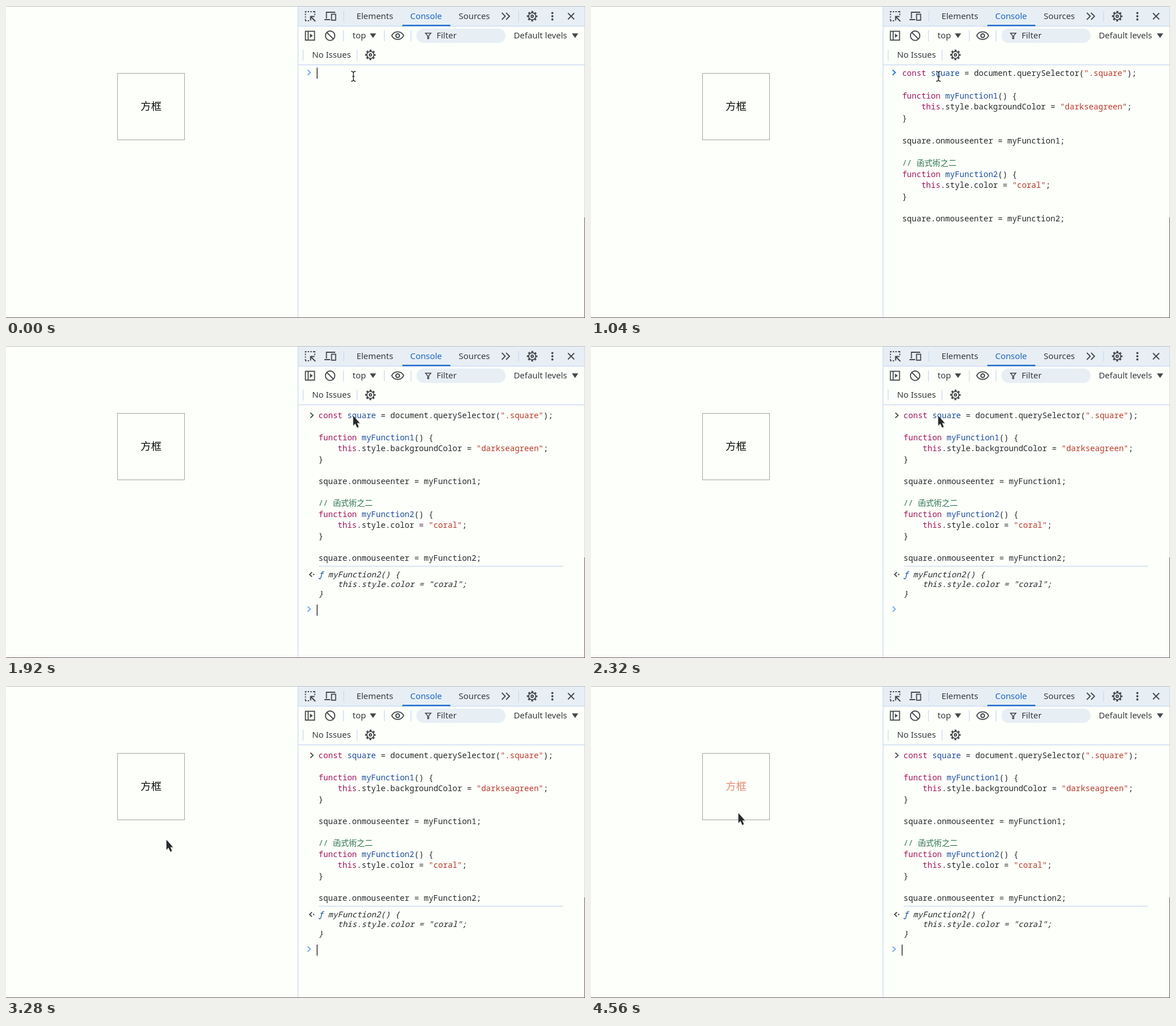
Animation, 1020 px wide and 549 px high, one loop 4640 ms. Source, as an HTML page:

```html
<!DOCTYPE html>
<html lang="zh-Hant">
<head>
<meta charset="utf-8">
<title>Console demo</title>
<style>
html, body { margin: 0; width: 100%; height: 100%; overflow: hidden; background: #fdfffa; }
svg { display: block; width: 1020px; height: 549px; }
text { white-space: pre; fill: #26292b; }
.ui text { font: 14.9px "Noto Sans", sans-serif; fill: #36393c; }
.ui .active { fill: #1c66c4; }
.code text { font: 14.05px "Noto Sans Mono", "Noto Sans CJK TC", "Noto Sans CJK", monospace; }
.code .result { font-style: italic; }
.label { font: 18.5px "Noto Sans CJK TC", "Noto Sans CJK", sans-serif; }
.kw { fill: #a3175e; }
.def { fill: #1c4d9f; }
.str { fill: #b93a2c; }
.com { fill: #2b7250; }
.icon { fill: none; stroke: #43474a; stroke-width: 1.8; }
.solid { fill: #43474a; stroke: none; }
.sep { stroke: #cddcf2; stroke-width: 1.4; fill: none; }
.chev { fill: none; stroke-width: 1.8; }
</style>
</head>
<body>
<svg viewBox="0 0 1020 549">
  <defs>
    <g id="gear" class="icon">
      <circle r="8" stroke-width="2.6" stroke-dasharray="3.3 2.983" stroke-dashoffset="1.65"/>
      <circle r="6.2"/>
      <circle r="2" stroke-width="2"/>
    </g>
  </defs>

  <rect width="1020" height="549" fill="#fdfffa"/>
  <rect x="515" y="1" width="505" height="34" fill="#e7eff5"/>
  <path d="M0 .5H1020" stroke="#bcbfbd"/>
  <path d="M1019.5 1V372" stroke="#d2d6da"/>
  <path d="M1019.5 372V549M0 548.5H1020" stroke="#70585f"/>
  <path class="sep" d="M514.5 1V548M515 35.5H1019M515 103.5H1019"/>
  <path class="sep" d="M595 9V27M903 9V27M594.5 43V62M666.5 43V62M713.5 43V62M523.5 77V96M618.5 77V96"/>
  <rect x="698" y="33" width="85" height="2.6" rx="1" fill="#1f6fd0"/>
  <rect x="723" y="39.5" width="157" height="25.5" rx="12.7" fill="#e7eff5"/>

  <g class="ui">
    <text x="617.5" y="23.3">Elements</text>
    <text x="712" y="23.3" class="active">Console</text>
    <text x="797.5" y="23.3">Sources</text>
    <text x="610.5" y="57.3">top</text>
    <text x="758.5" y="57.3">Filter</text>
    <text x="894.5" y="57.3">Default levels</text>
    <text x="539.3" y="91.3">No Issues</text>
  </g>

  <g class="icon">
    <path d="M527 10H545M527.5 9V27M544 9V17M527 26H535" stroke-dasharray="2.4 2.2"/>
    <path d="M545 27L537.5 19.5M536.6 25.5V18.6H543.6" stroke-width="2"/>
    <path d="M564.5 22V11H580M561 24H571"/>
    <rect x="573.5" y="14.5" width="7.2" height="10.5"/>
    <path d="M873.5 12L879.5 18L873.5 24M881 12L887 18L881 24"/>
    <path d="M990 12.5L1001 23.5M1001 12.5L990 23.5"/>
    <rect x="527.5" y="44.5" width="16" height="15.5"/>
    <path d="M532.3 45V60"/>
    <circle cx="571" cy="52.3" r="8.3"/>
    <path d="M565.2 46.5L576.8 58.1"/>
    <path d="M679.5 52.2C684 43.2 696 43.2 700.5 52.2C696 61.2 684 61.2 679.5 52.2Z"/>
    <circle cx="690" cy="52.2" r="3.2" stroke-width="2"/>
    <path d="M739 47.7H748.5L744.7 52.5V57.5H742.8V52.5Z" stroke-width="1.5"/>
  </g>
  <g class="solid">
    <circle cx="962.5" cy="12.3" r="1.9"/>
    <circle cx="962.5" cy="18" r="1.9"/>
    <circle cx="962.5" cy="23.7" r="1.9"/>
    <path d="M535.5 48.5V56L540.5 52.3Z"/>
    <path d="M641 48.3H652L646.5 56.3Z"/>
    <path d="M997 48.3H1008L1002.5 56.3Z"/>
  </g>
  <use href="#gear" x="927" y="18"/>
  <use href="#gear" x="642" y="86"/>

  <rect x="196.5" y="118.5" width="118" height="117" fill="none" stroke="#a3a5a2"/>
  <text id="label" class="label" x="237" y="183">方框</text>

  <g id="typed" class="code"></g>
  <g id="logged" class="code">
    <path class="chev" stroke="#4a4d50" d="M536.2 117.5L541 122L536.2 126.5"/>
    <path class="chev" stroke="#4a4d50" d="M539 398L534.8 402L539 406"/>
    <circle cx="542" cy="402" r="1.3" fill="#4a4d50"/>
    <path class="sep" d="M551 387.5H981.5"/>
    <text class="result" x="550.5" y="407"><tspan class="def">ƒ</tspan> myFunction2() {</text>
    <text class="result" x="550.5" y="424">    this.style.color = "coral";</text>
    <text class="result" x="550.5" y="441">}</text>
  </g>

  <path id="prompt" class="chev" d="M531.3 112.5L536.2 117L531.3 121.5"/>
  <rect id="caret" width="1.4" height="19.5" fill="#202224"/>

  <g id="beam" fill="none">
    <path d="M608 115Q612 115 612 118.5Q612 115 616 115M612 118V129M608 132.5Q612 132.5 612 129Q612 132.5 616 132.5" stroke="#fff" stroke-width="3.4" opacity=".8"/>
    <path d="M608 115Q612 115 612 118.5Q612 115 616 115M612 118V129M608 132.5Q612 132.5 612 129Q612 132.5 616 132.5M610 124H614" stroke="#303336" stroke-width="1.5"/>
  </g>
  <g id="arrow">
    <path d="M1 2V20L5 16.6L8 23.5L11.5 22L8.6 15.4H14Z" fill="#000" opacity=".14"/>
    <path d="M.6 .6V18L4.4 14.6L7.4 21.4L10.4 20.1L7.5 13.5H12.2Z" fill="#27292b" stroke="#fff" stroke-width="1.1" stroke-opacity=".75" paint-order="stroke"/>
  </g>
</svg>

<script>
const LOOP = 4640, STEP = 80;
const PASTE = 480, ARROW = 1680, RUN = 1840, HOVER = 3840;
const $ = id => document.getElementById(id);

const source = `const square = document.querySelector(".square");

function myFunction1() {
    this.style.backgroundColor = "darkseagreen";
}

square.onmouseenter = myFunction1;

// 函式術之二
function myFunction2() {
    this.style.color = "coral";
}

square.onmouseenter = myFunction2;`.split("\n");

const span = (cls, s) => `<tspan class="${cls}">${s}</tspan>`;

function highlight(line) {
  if (line.startsWith("//")) return span("com", line);
  return line
    .replace(/"[^"]*"/g, s => `{{${s}}}`)
    .replace(/^(const|function) (\w+)/, (m, k, d) => span("kw", k) + " " + span("def", d))
    .replace(/\bthis\b/, s => span("kw", s))
    .replace(/\{\{(.*?)\}\}/g, (m, s) => span("str", s));
}

function writeCode(group, x, y, pitch) {
  group.insertAdjacentHTML("beforeend", source.map((line, i) =>
    line && `<text x="${x}" y="${y + i * pitch}">${highlight(line)}</text>`).join(""));
}
writeCode($("typed"), 548.2, 123.4, 19.69);
writeCode($("logged"), 550.6, 127, 19.3);

// time, x, y of the pointer tip
const path = [
  [2320, 611, 122], [2480, 578, 150], [2640, 524, 206], [2800, 474, 248],
  [2960, 408, 270], [3120, 338, 276], [3280, 282, 270], [3440, 260, 262],
  [3600, 259, 251], [3760, 259, 227], [3840, 259, 223]
];

function pointer(t) {
  const i = path.findIndex(p => p[0] >= t);
  if (i < 0) return path[path.length - 1].slice(1);
  if (i === 0) return path[0].slice(1);
  const a = path[i - 1], b = path[i], k = (t - a[0]) / (b[0] - a[0]);
  return [1, 2].map(n => a[n] + (b[n] - a[n]) * k);
}

// moments at which the caret goes on, off, on, ...
const blinks = [0, 240, 480, 1040, 1680, 2240, 2880, 3440, 4080];
const caretOn = t => blinks.filter(b => b <= t).length % 2 === 1;

const show = (id, on) => $(id).setAttribute("visibility", on ? "visible" : "hidden");
const place = (id, x, y) => $(id).setAttribute("transform", `translate(${x} ${y})`);

function draw(t) {
  const typed = t >= PASTE && t < RUN, ran = t >= RUN;
  show("typed", typed);
  show("logged", ran);
  place("prompt", 0, ran ? 346 : 0);
  $("prompt").setAttribute("stroke", typed ? "#2473d8" : "#70aaf0");
  place("caret", typed ? 960.6 : 547.4, ran ? 455 : 108.5);
  show("caret", caretOn(t));
  show("beam", t < ARROW);
  show("arrow", t >= ARROW);
  place("arrow", ...pointer(t));
  $("label").style.fill = t >= HOVER ? "#e38c74" : "#0c0d0d";
}

const start = performance.now();
function tick() {
  const t = (performance.now() - start + 1) % LOOP;
  draw(Math.floor(t / STEP) * STEP);
  requestAnimationFrame(tick);
}
draw(0);
requestAnimationFrame(tick);
</script>
</body>
</html>
```
